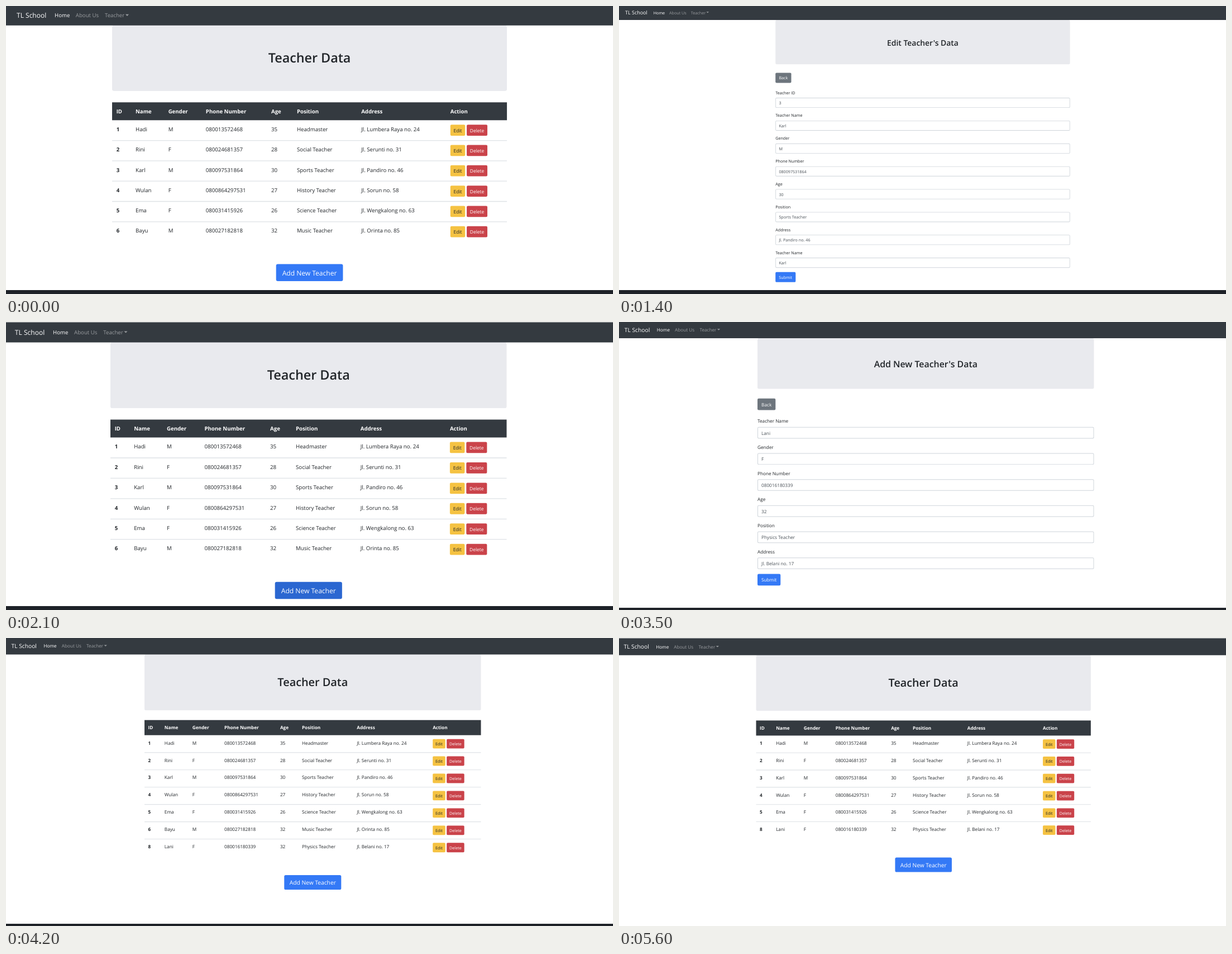
These frames come from a looping animation (1087x515 px, 6300 ms). An HTML page with a canvas:

```html
<!DOCTYPE html>
<html lang="en">
<head>
<meta charset="utf-8">
<title>Teacher Data</title>
<style>
  html, body { margin: 0; width: 100%; height: 100%; overflow: hidden; background: #fff; }
  canvas { display: block; width: 1087px; height: 515px; }
</style>
</head>
<body>
<canvas id="stage" width="1087" height="515"></canvas>
<script>
const W = 1087, H = 515, HOLD = 700;
const ctx = document.getElementById("stage").getContext("2d");
const FAMILY = '"Open Sans", "Noto Sans", sans-serif';
const WIDTH_RATIO = { 400: 0.945, 600: 0.915, 700: 0.943 };
const COLOR = {
  dark: "#343a40", panel: "#e9eaee", ink: "#212529", field: "#495057",
  line: "#dee2e6", border: "#ced4da", muted: "#999c9f", white: "#fff",
  blue: "#3479f6", blueHover: "#2b67d1", yellow: "#f5c242", red: "#ca434a",
  gray: "#6d757d", taskbar: "#1e2228"
};

const COLUMNS = [12, 66, 158, 263.5, 447.5, 519.5, 700.5];
const HEADERS = ["ID", "Name", "Gender", "Phone Number", "Age", "Position", "Address"];
const LABELS = ["Teacher Name", "Gender", "Phone Number", "Age", "Position", "Address"];
const STAFF = [
  ["1", "Hadi", "M", "080013572468", "35", "Headmaster", "Jl. Lumbera Raya no. 24"],
  ["2", "Rini", "F", "080024681357", "28", "Social Teacher", "Jl. Serunti no. 31"],
  ["3", "Karl", "M", "080097531864", "30", "Sports Teacher", "Jl. Pandiro no. 46"],
  ["4", "Wulan", "F", "0800864297531", "27", "History Teacher", "Jl. Sorun no. 58"],
  ["5", "Ema", "F", "080031415926", "26", "Science Teacher", "Jl. Wengkalong no. 63"],
  ["6", "Bayu", "M", "080027182818", "32", "Music Teacher", "Jl. Orinta no. 85"],
  ["8", "Lani", "F", "080016180339", "32", "Physics Teacher", "Jl. Belani no. 17"]
];
const person = id => STAFF.find(p => p[0] === id);
const without = id => STAFF.filter(p => p[0] !== id);

// Each view: page scale k, container left x, navbar bottom y, brand x, taskbar top.
const view = (k, x, y, brand, bar, draw) => ({ k, x, y, brand, bar, draw });
const firstSix = without("8");
const karl = person("3");
const editForm = () => form("Edit Teacher's Data",
  ["Teacher ID", ...LABELS, "Teacher Name"], [...karl, karl[1]]);
const addForm = values => form("Add New Teacher's Data", LABELS, values);

const VIEWS = [
  view(0.637, 190, 34.7, 19, 508, () => list(firstSix)),
  view(0.637, 190.7, 34.7, 19.7, 508, () => list(firstSix)),
  view(0.4752, 280.2, 25.1, 11, 508, editForm),
  view(0.6392, 187, 36.4, 15.8, 508, () => list(firstSix, true)),
  view(0.5419, 248, 27.8, 10.3, 511, () => addForm([])),
  view(0.5428, 248, 29.1, 9.8, 511, () => addForm(person("8").slice(1))),
  view(0.5428, 248, 29.4, 9.5, 511, () => list(STAFF)),
  view(0.5419, 247, 30, 9, 511, () => list(STAFF)),
  view(0.54, 245.5, 30.8, 8.5, H, () => list(without("6")))
];

// All coordinates below are page pixels, measured from the container's top left.
function text(str, x, y, size, color = COLOR.ink, weight = 400, align = "left") {
  ctx.font = `${weight} ${size * WIDTH_RATIO[weight]}px ${FAMILY}`;
  ctx.textAlign = align;
  ctx.fillStyle = color;
  ctx.fillText(str, x, y);
}

function box(x, y, w, h, color, radius = 0) {
  ctx.fillStyle = color;
  ctx.beginPath();
  ctx.roundRect(x, y, w, h, radius);
  ctx.fill();
}

function button(label, x, y, w, color, ink = COLOR.white) {
  box(x, y, w, 38, color, 4);
  text(label, x + w / 2, y + 25.3, 16, ink, 400, "center");
}

function smallButton(label, x, y, w, color, ink) {
  box(x, y, w, 31, color, 3.2);
  text(label, x + w / 2, y + 21, 14, ink, 400, "center");
}

function banner(title, size, height) {
  box(0, 0, 1110, height, COLOR.panel, 4.8);
  text(title, 555, 64 + size * 1.015, size, COLOR.ink, 600, "center");
}

function navbar(v) {
  ctx.save();
  ctx.translate(v.brand, v.y);
  ctx.scale(v.k, v.k);
  box(-100, -56, 2600, 56, COLOR.dark);
  text("TL School", 0, -21, 20, COLOR.white);
  text("Home", 106.8, -22.3, 16, COLOR.white);
  text("About Us", 166.2, -22.3, 16, COLOR.muted);
  text("Teacher", 248, -22.3, 16, COLOR.muted);
  ctx.beginPath();
  ctx.moveTo(306, -31.2);
  ctx.lineTo(315.6, -31.2);
  ctx.lineTo(310.8, -26.4);
  ctx.fill();
  ctx.restore();
}

function list(rows, hover) {
  banner("Teacher Data", 40, 184);
  ctx.translate(0, 216);
  box(0, 0, 1110, 50, COLOR.dark);
  HEADERS.forEach((h, i) => text(h, COLUMNS[i], 30.6, 16, COLOR.white, 700));
  text("Action", 951, 30.6, 16, COLOR.white, 700);
  rows.forEach((row, r) => {
    const y = 50 + 57 * r;
    if (r) box(0, y - 0.8, 1110, 2, COLOR.line);
    row.forEach((cell, i) => text(cell, COLUMNS[i], y + 31, 16, COLOR.ink, i ? 400 : 700));
    smallButton("Edit", 951, y + 12.7, 41.5, COLOR.yellow, COLOR.ink);
    smallButton("Delete", 997, y + 12.7, 58, COLOR.red, COLOR.white);
  });
  const y = 112 + 57 * rows.length;
  box(461, y, 188, 48, hover ? COLOR.blueHover : COLOR.blue, 4.8);
  text("Add New Teacher", 555, y + 32, 20, COLOR.white, 400, "center");
}

function form(title, labels, values) {
  banner(title, 32, 166.4);
  ctx.translate(0, 198.4);
  button("Back", 0, 0, 59.5, COLOR.gray);
  labels.forEach((label, i) => {
    const y = 94 + 86 * i;
    text(label, 0, y - 13.6, 16);
    box(0, y, 1110, 38, COLOR.border, 4);
    box(1.8, y + 1.8, 1106.4, 34.4, COLOR.white, 2.6);
    if (values[i]) text(values[i], 13, y + 25.3, 16, COLOR.field);
  });
  button("Submit", 0, 62 + 86 * labels.length, 76, COLOR.blue);
}

function paint(v) {
  ctx.setTransform(1, 0, 0, 1, 0, 0);
  ctx.textRendering = "geometricPrecision";
  box(0, 0, W, H, COLOR.white);
  ctx.save();
  ctx.translate(v.x, v.y);
  ctx.scale(v.k, v.k);
  v.draw();
  ctx.restore();
  navbar(v);
  box(0, v.bar, W, H - v.bar, COLOR.taskbar);
}

const start = performance.now();
function tick() {
  const elapsed = Math.max(0, performance.now() - start);
  paint(VIEWS[Math.floor(elapsed / HOLD) % VIEWS.length]);
  requestAnimationFrame(tick);
}
tick();
</script>
</body>
</html>
```
